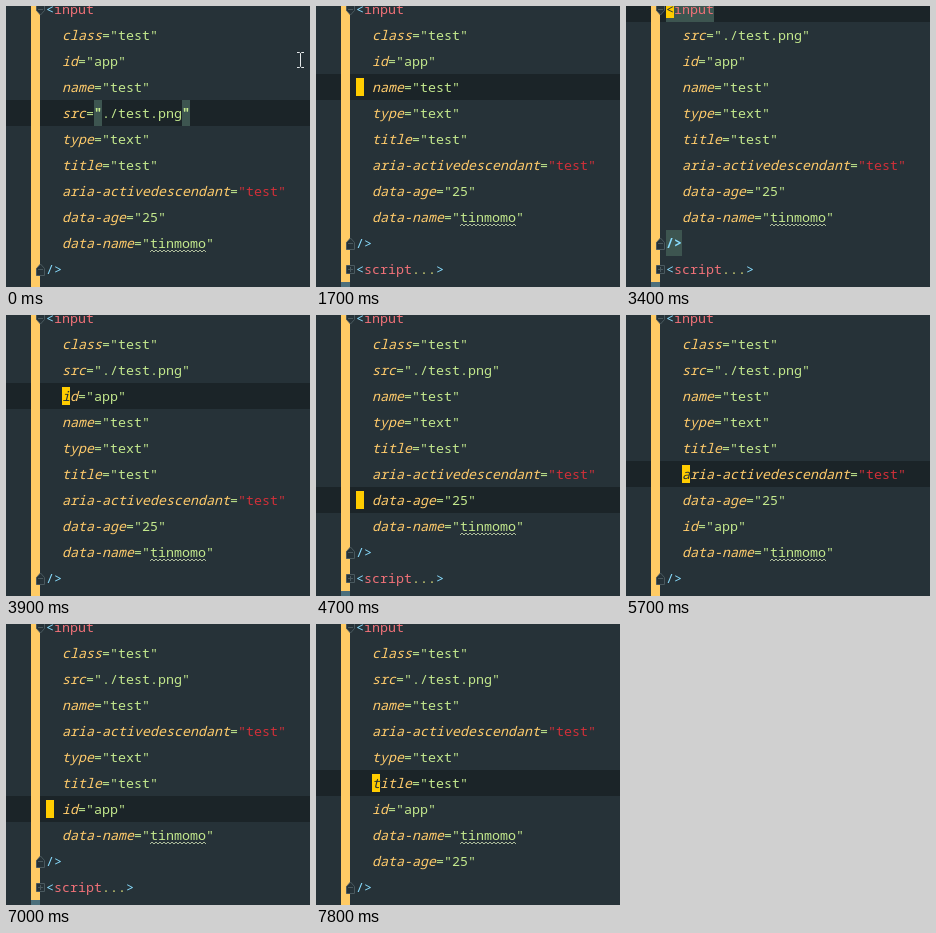
These frames come from a looping animation (304x281 px, 8000 ms). An HTML page:

```html
<!DOCTYPE html>
<html lang="en">
<head>
<meta charset="utf-8">
<title>Moving attributes in an editor</title>
<style>
  html, body { margin: 0; width: 100%; height: 100%; overflow: hidden; background: #263238; }
  #stage {
    position: relative; width: 304px; height: 281px; overflow: hidden;
    background: #263238; color: #c3e88d;
    font: 13.333px/26px "Noto Sans Mono", "DejaVu Sans Mono", monospace;
  }
  #stage div, #stage svg { position: absolute; }
  .line { left: 40px; height: 26px; white-space: pre; }
  #current { left: 0; width: 304px; height: 26px; background: #1b2428; }
  #gutter, #bar { left: 25px; top: 0; width: 9px; height: 281px; }
  #gutter { background: #4b6f7c; }
  #bar { background: #ffcb65; }
  .tint { height: 26px; background: #3d5550; }
  #cursor {
    width: 8px; height: 18px; line-height: 18px; white-space: pre;
    background: #ffcc00; color: #263238;
  }
  .attr { color: #ffcb6b; font-style: italic; }
  .tag { color: #f07178; }
  .mark { color: #89ddff; }
  .dots { color: #d6d878; }
  .bad { color: #cf3039; }
  .match { font-weight: bold; }
  .typo { position: relative; }
  .typo svg { left: 0; top: 15px; }
  .fold { left: 30px; width: 10px; height: 13px; stroke: #4a595f; }
  #mouse { left: 290px; top: 46px; }
  path, polyline { fill: none; }
  .fold path:first-child { fill: #263238; }
</style>
</head>
<body>
<div id="stage">
  <div id="current"></div>
  <div id="gutter"></div>
  <div id="bar"></div>
  <div id="tints"></div>
  <div id="text"></div>
  <div id="cursor"></div>
  <svg id="mouse" width="9" height="16" stroke="#e6eaeb">
    <path d="M1 .5H3.5L4.5 1.5 5.5 .5H8M4.5 1.5V14M1 15.5H3.5L4.5 14.5 5.5 15.5H8"/>
  </svg>
</div>
<script>
const LOOP = 8000, ROW = 26, TOP = -10, LEFT = 40, CHAR = 8;

const attrs = {
  c: ['class', 'test'], i: ['id', 'app'], n: ['name', 'test'],
  s: ['src', './test.png'], t: ['type', 'text'], l: ['title', 'test'],
  a: ['aria-activedescendant', 'test'], g: ['data-age', '25'],
  d: ['data-name', 'tinmomo']
};

// [time / 100 ms, cursor row, changes]; changes persist, except hl,
// which keeps the line highlight on another row for that step.
const script = [
  [0, 4, { order: 'cinstlagd', col: 6, show: false, mouse: true, tint: 'quotes' }],
  [1, 4, { col: 7, show: true, mouse: false, tint: '' }],
  [2, 4, { col: 9 }],
  [3, 4, { col: 13 }],
  [4, 4, { col: 14 }],
  [6, 4, { show: false }],
  [11, 3, { show: true, col: 12 }],
  [14, 4, { col: 14 }],
  [17, 3, { order: 'cintlagd', col: 0 }],
  [19, 2], [20, 1],
  [21, 0, { tint: 'open close' }],
  [22, 1, { col: 2 }],
  [24, 1, { order: 'scintlagd', tint: 'open' }],
  [26, 1, { tint: '' }],
  [27, 2],
  [29, 2, { order: 'sintlagd', col: 0 }],
  [31, 1], [33, 0],
  [34, 0, { tint: 'open close' }],
  [36, 1, { order: 'csintlagd', col: 2, tint: '', hl: 0 }],
  [37, 1], [38, 2], [39, 3],
  [42, 2, { order: 'csntlagd', col: 0 }],
  [43, 4], [45, 5], [46, 6], [47, 7],
  [49, 8, { order: 'csntlagid', col: 2, hl: 7 }],
  [53, 8], [56, 7], [57, 6],
  [58, 6, { order: 'csntlid', col: 0 }],
  [59, 5], [60, 4], [61, 3],
  [63, 4, { order: 'csnagtlid', col: 2, fresh: true }],
  [64, 5],
  [65, 5, { fresh: false }],
  [68, 5, { order: 'csnatlid', col: 0 }],
  [69, 6], [70, 7], [72, 8],
  [74, 9, { order: 'csnatlidg', col: 2, hl: 8 }],
  [76, 9], [77, 7], [78, 6]
];

let last = {};
const steps = script.map(([t, row, change]) =>
  last = { ...last, hl: row, ...change, row, time: t * 100 });

const $ = id => document.getElementById(id);
const rowTop = row => TOP + row * ROW;
const span = (cls, text) => `<span class="${cls}">${text}</span>`;

function wave(width) {
  const points = Array.from({ length: width / 2 + 1 }, (_, i) => `${i * 2},${i % 2 ? 1 : 3}`);
  return `<svg width="${width}" height="5" stroke="#aebd9c"><polyline points="${points.join(' ')}"/></svg>`;
}

function attrHtml(key, s) {
  const [name, value] = attrs[key];
  const quote = key === 's' && s.tint === 'quotes' ? span('match', '"') : '"';
  const inner = key === 'd' ? span('typo', value + wave(value.length * CHAR)) : value;
  const quoted = quote + inner + quote;
  return '  ' + span('attr', name) + '=' +
    (key === 'a' && !s.fresh ? span('bad', quoted) : quoted);
}

function foldMark(row, kind) {
  const shapes = {
    open: 'M.5 .5H8.5V7.5L4.5 12 .5 7.5Z',
    close: 'M.5 12.5H8.5V5.5L4.5 1 .5 5.5Z',
    folded: 'M.5 2.5H8.5V10.5H.5Z'
  };
  const sign = kind === 'folded' ? 'M2 6.5H7M4.5 4V9' : 'M2 6.5H7';
  return `<svg class="fold" style="top:${rowTop(row) + 7}px"><path d="${shapes[kind]}"/><path d="${sign}"/></svg>`;
}

const box = (row, col, chars) =>
  `<div class="tint" style="left:${LEFT + col * CHAR}px;top:${rowTop(row)}px;width:${chars * CHAR}px"></div>`;

function draw(s) {
  const end = s.order.length + 1;
  const closing = s.tint.includes('close');
  const lines = [
    span('mark', '&lt;') + span('tag', 'input'),
    ...[...s.order].map(key => attrHtml(key, s)),
    span(closing ? 'mark match' : 'mark', '/&gt;'),
    span('mark', '&lt;') + span('tag', 'script') + span('dots', '...') + span('mark', '&gt;')
  ];
  $('text').innerHTML = lines.map((html, i) =>
    `<div class="line" style="top:${rowTop(i)}px">${html}</div>`).join('') +
    foldMark(0, 'open') + foldMark(end, 'close') + foldMark(end + 1, 'folded');

  $('tints').innerHTML =
    (s.tint.includes('open') ? box(0, 0, 6) : '') +
    (closing ? box(end, 0, 2) : '') +
    (s.tint === 'quotes' ? box(4, 6, 1) + box(4, 17, 1) : '');

  $('bar').style.height = rowTop(end + 2) + 'px';
  $('current').style.top = rowTop(s.hl) + 'px';
  $('mouse').style.display = s.mouse ? '' : 'none';

  const cursor = $('cursor');
  const plain = $('text').children[s.row].textContent;
  const inName = s.row > 0 && s.col < plain.indexOf('=');
  cursor.style.display = s.show ? '' : 'none';
  cursor.style.left = LEFT + s.col * CHAR + 'px';
  cursor.style.top = rowTop(s.row) + 4 + 'px';
  cursor.style.fontStyle = inName ? 'italic' : 'normal';
  cursor.textContent = plain[s.col] || ' ';
}

let shown;
function tick() {
  const time = performance.now() % LOOP;
  const step = steps.findLast(s => s.time <= time);
  if (step !== shown) draw(shown = step);
  requestAnimationFrame(tick);
}
tick();
</script>
</body>
</html>
```
